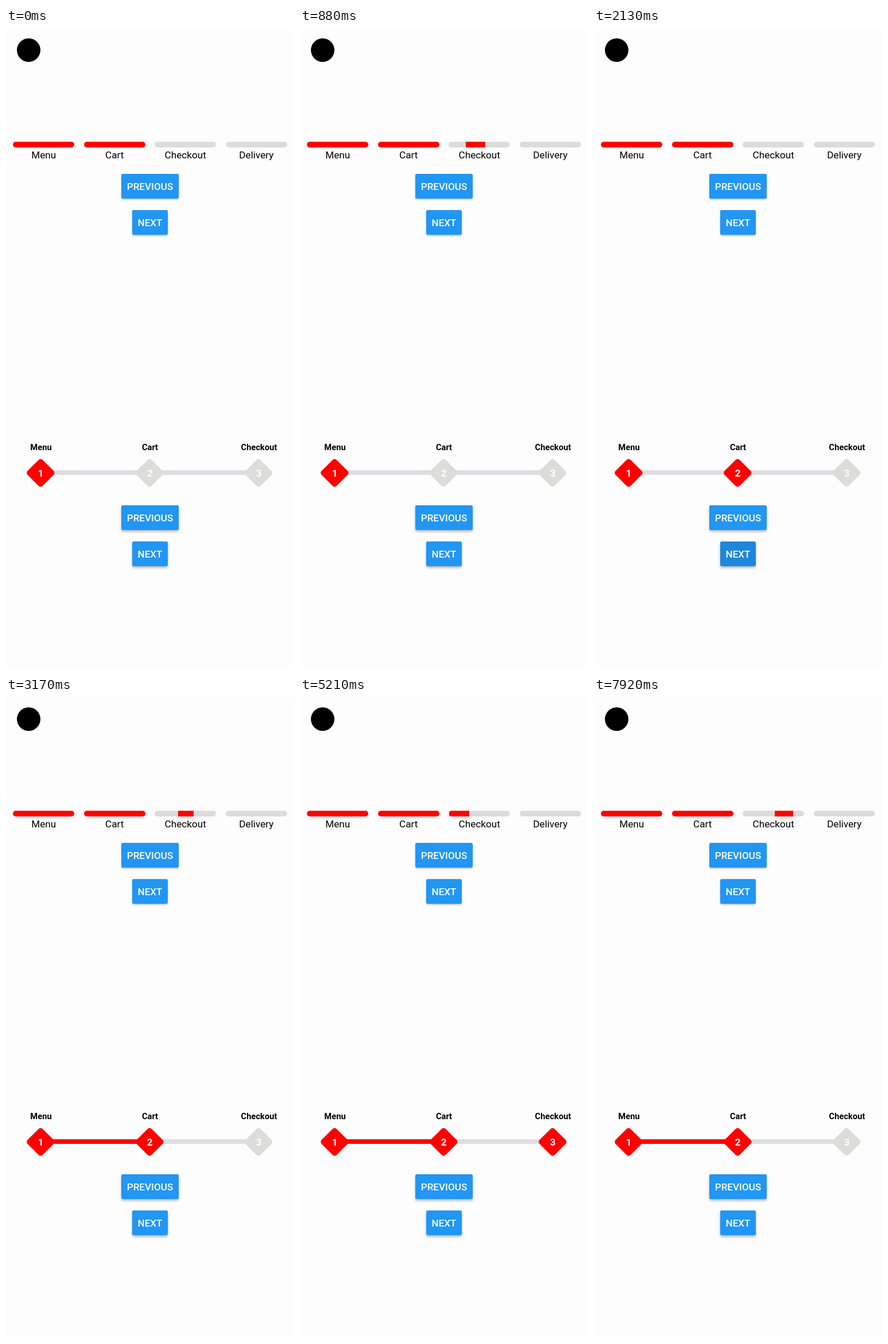
Write an HTML page that moves like this. It is 502 px wide and 1116 px high and loops after 8000 ms.

```html
<!DOCTYPE html>
<html lang="en">
<head>
<meta charset="utf-8">
<title>Step progress</title>
<style>
  html, body { margin: 0; width: 100%; height: 100%; overflow: hidden; background: #fdfdfd; }
  #stage { position: relative; width: 502px; height: 1116px; overflow: hidden; font-family: Roboto, sans-serif; color: #000; }
  #stage div { position: absolute; box-sizing: border-box; }
  .camera { left: 18.5px; top: 18px; width: 41px; height: 41px; border-radius: 50%; background: #000; }
  .bar { top: 198px; width: 107.4px; height: 10px; border-radius: 5px; background: #dcddda; overflow: hidden; }
  .bar.done { background: #f00; }
  #runner { top: 0; height: 10px; background: #f00; }
  .label { width: 120px; margin-left: -60px; text-align: center; white-space: nowrap; line-height: 20px; }
  .section { top: 211px; font-size: 17.2px; }
  .title { top: 720px; font-size: 14.7px; font-weight: 700; }
  .button { height: 43px; border-radius: 2.4px; background-color: #2196f3; color: #fff; font-size: 17.1px;
    font-weight: 500; line-height: 44px; text-align: center; box-shadow: 0 2px 3px rgba(0,0,0,.22), 0 0 2px rgba(0,0,0,.08); }
  .button.low { box-shadow: 0 3px 4px rgba(0,0,0,.27), 0 0 2px rgba(0,0,0,.08); }
  .line { top: 770.2px; width: 190px; height: 7.5px; background: #dddde0; }
  .fill { height: 100%; background: #f00; }
  .diamond { top: 755.7px; width: 36.6px; height: 36.6px; margin-left: -18.3px; border-radius: 4.9px; transform: rotate(45deg); background: #dcddda; }
  .diamond.on { background: #f00; }
  .digit { top: 764.5px; font-size: 17.1px; font-weight: 700; color: #fff; }
</style>
</head>
<body>
<div id="stage"><div class="camera"></div></div>
<script>
const stage = document.getElementById('stage');
const LOOP = 8000, SWEEP = 2200;

function add(cls, left, text = '', parent = stage) {
  const el = document.createElement('div');
  el.className = cls;
  el.style.left = left + 'px';
  el.textContent = text;
  return parent.appendChild(el);
}

function button(text, left, top, width, low) {
  const el = add(low ? 'button low' : 'button', left, text);
  el.style.top = top + 'px';
  el.style.width = width + 'px';
  return el;
}

const bars = ['Menu', 'Cart', 'Checkout', 'Delivery'].map((name, i) => {
  add('label section', 65.7 + i * 123.55, name);
  return add(i < 2 ? 'bar done' : 'bar', 12 + i * 123.55);
});
const runner = add('', 0, '', bars[2]);
runner.id = 'runner';

button('PREVIOUS', 201, 254, 100);
button('NEXT', 220, 317, 62);
const previous = button('PREVIOUS', 201, 831, 100, true);
const next = button('NEXT', 220, 894, 62, true);

const fills = [60.5, 250.5].map(x => add('fill', 0, '', add('line', x)));
const diamonds = ['Menu', 'Cart', 'Checkout'].map((name, i) => {
  const x = 60.7 + i * 190;
  add('label title', x + 0.3, name);
  const el = add('diamond', x);
  add('label digit', x, i + 1);
  return el;
});

const clamp = v => Math.min(1, Math.max(0, v));
const ramp = (t, from, to) => clamp((t - from) / (to - from));

// Piecewise-linear value through [time, value] points
function track(points, t) {
  if (t <= points[0][0]) return points[0][1];
  for (let i = 1; i < points.length; i++) {
    const [t0, v0] = points[i - 1], [t1, v1] = points[i];
    if (t <= t1) return v0 + (v1 - v0) * (t - t0) / (t1 - t0);
  }
  return points[points.length - 1][1];
}

// The runner enters fast, slows in the middle and leaves fast
const head = [[720, 0], [810, 36], [880, 64], [970, 68], [1320, 88], [1400, 108]];
const tail = [[780, -6], [810, 0], [880, 30], [970, 41], [1320, 56], [1470, 108]];

function ripple(el, x, y, age) {
  const r = age * 0.212;
  const alpha = age < 0 ? 0 : 0.1 * (1 - ramp(age, 250, 480));
  el.style.backgroundImage = alpha
    ? `radial-gradient(circle at ${x}px ${y}px, rgba(0,0,0,${alpha}) ${r}px, transparent ${r + 0.7}px)`
    : 'none';
}

function draw(now) {
  const t = now % LOOP, phase = t % SWEEP;
  const from = track(tail, phase), to = track(head, phase);
  runner.style.left = from + 'px';
  runner.style.width = Math.max(0, to - from) + 'px';

  const pressed = t < 3500 ? 1940 : 4480;
  ripple(next, 31, 20, t - pressed);
  ripple(previous, 47, 12, t - 6420);

  diamonds[0].classList.add('on');
  diamonds[1].classList.toggle('on', t >= 2050);
  diamonds[2].classList.toggle('on', t >= 4600 && t < 6650);
  fills[0].style.width = 100 * ramp(t, 2500, 2800) + '%';
  fills[1].style.width = 100 * (ramp(t, 5300, 5600) - ramp(t, 6650, 6900)) + '%';
  requestAnimationFrame(() => draw(performance.now() - start));
}

const start = performance.now();
draw(0);
</script>
</body>
</html>
```
